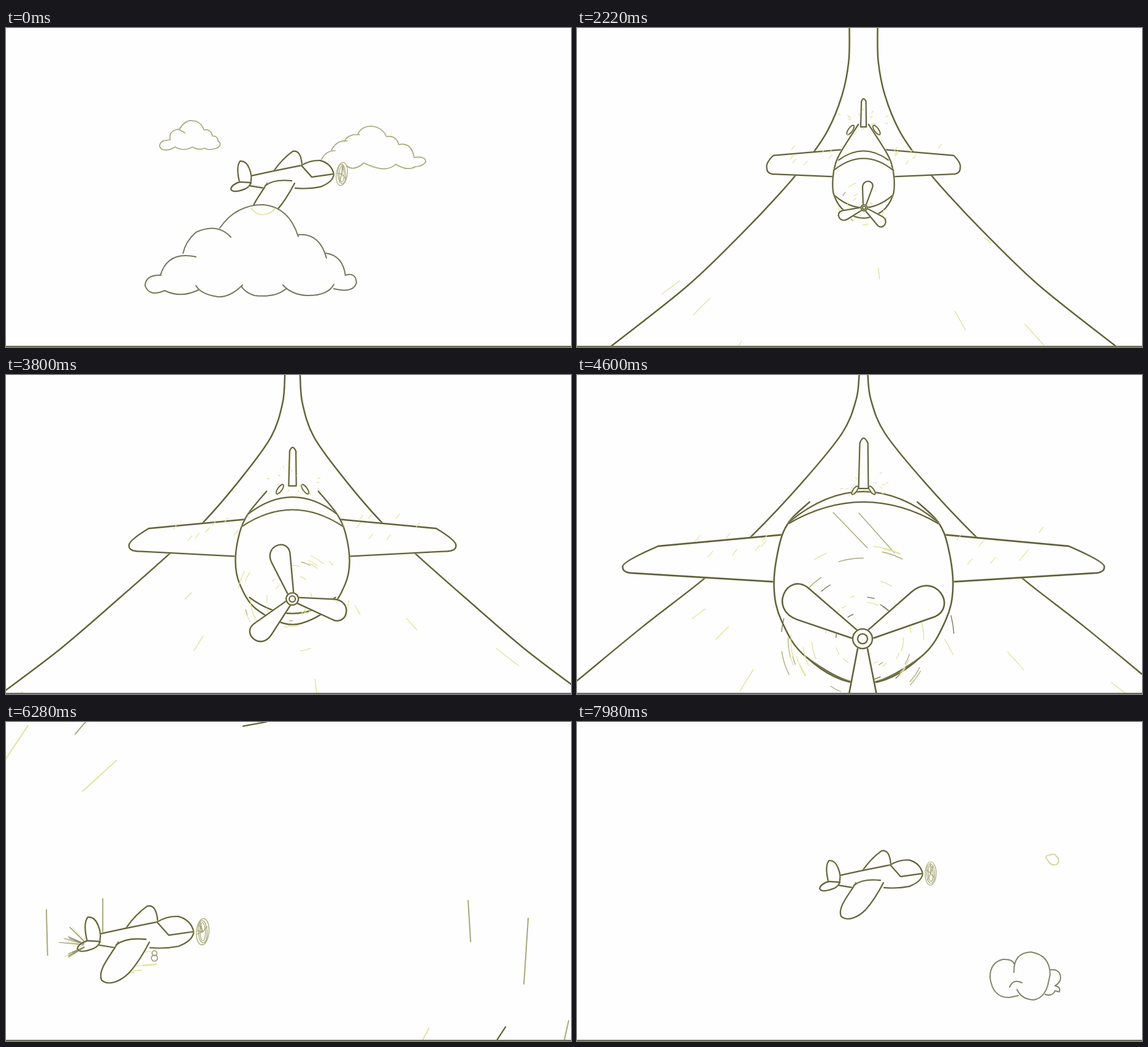
Animation of 922 by 520 pixels, one loop 8000 ms. Source, as an HTML page with a canvas:

```html
<!DOCTYPE html>
<html lang="en">
<head>
<meta charset="utf-8">
<title>Sketched plane</title>
<style>
html, body { margin: 0; width: 100%; height: 100%; overflow: hidden; background: #fefefe; }
canvas { display: block; }
</style>
</head>
<body>
<canvas id="stage" width="922" height="520"></canvas>
<script>
const ctx = document.getElementById('stage').getContext('2d');
const LOOP = 8000, W = 922, H = 520, MID = 467.5;
const INK = '#5a5a40', PALE = '#e2e29c', SOFT = '#a8a878', PAPER = '#fefefe';

const clamp = (v, a = 0, b = 1) => Math.min(b, Math.max(a, v));
const mix = (a, b, u) => a.map((v, i) => v + (b[i] - v) * u);

function random(seed) {
  let s = seed * 7919 + 12345 >>> 0;
  return () => {
    s = s + 0x6D2B79F5 >>> 0;
    let x = Math.imul(s ^ s >>> 15, 1 | s);
    x ^= x + Math.imul(x ^ x >>> 7, 61 | x);
    return ((x ^ x >>> 14) >>> 0) / 4294967296;
  };
}

// Piecewise linear track of [time, ...values]; the ends extrapolate.
function track(t, keys) {
  let i = 0;
  while (i < keys.length - 2 && t > keys[i + 1][0]) i++;
  const a = keys[i], b = keys[i + 1];
  return mix(a, b, (t - a[0]) / (b[0] - a[0])).slice(1);
}

function ink(path, color = INK, width = 2, fill) {
  if (fill) { ctx.fillStyle = PAPER; ctx.fill(path); }
  if (color === INK) {
    ctx.strokeStyle = 'rgba(214,214,140,.5)';
    ctx.lineWidth = width + 1.6;
    ctx.stroke(path);
  }
  ctx.strokeStyle = color;
  ctx.lineWidth = width;
  ctx.stroke(path);
}

function line(x1, y1, x2, y2, color = PALE, width = 1.4) {
  const p = new Path2D();
  p.moveTo(x1, y1);
  p.lineTo(x2, y2);
  ink(p, color, width);
}

// Smooth curve through points
function curve(pts) {
  const p = new Path2D();
  p.moveTo(...pts[0]);
  for (let i = 0; i < pts.length - 1; i++) {
    const a = pts[i - 1] || pts[i], b = pts[i], c = pts[i + 1], d = pts[i + 2] || c;
    p.bezierCurveTo(b[0] + (c[0] - a[0]) / 6, b[1] + (c[1] - a[1]) / 6,
      c[0] - (d[0] - b[0]) / 6, c[1] - (d[1] - b[1]) / 6, c[0], c[1]);
  }
  return p;
}

const pairs = (v, side = 1) => {
  const out = [];
  for (let i = 0; i < v.length; i += 2) out.push([MID + side * v[i], v[i + 1]]);
  return out;
};

/* ---------- front view ---------- */

// Half outlines as (distance from the middle, y)
const trails = [
  [31, 0, 30, 60, 35, 115, 45, 175, 64, 213, 110, 278, 165, 341, 250, 430, 355, 519],
  [16, 0, 19, 50, 35, 105, 70, 160, 118, 222, 162, 265, 230, 332, 320, 412, 462, 519],
  [7, 0, 12, 40, 35, 95, 100, 175, 182, 262, 260, 332, 360, 410, 467, 498, 494, 519]
];

const poses = [
  { tail: [4, 133], wing: [30, 175, 123, 181, 129, 196, 124, 209, 41, 213],
    body: [30, 178, 38, 196, 41, 213, 41, 240, 24, 263, 0, 272],
    arcs: [41, 212, 195, 41, 212, 195, 38, 245, 270],
    fin: [101, 142, 4], stab: [17, 145, 8], prop: [469, 260, 33, 4, 36] },
  { tail: [12, 178], wing: [44, 219, 168, 231, 183, 256, 163, 264, 59, 268],
    body: [40, 218, 52, 242, 58, 275, 54, 302, 36, 330, 0, 343],
    arcs: [40, 218, 205, 56, 250, 228, 55, 298, 313],
    fin: [128, 178, 5], stab: [25, 185, 10], prop: [468, 322, 52, 6, 52] },
  { tail: [88, 207], wing: [128, 260, 335, 279, 393, 313, 375, 323, 147, 337],
    body: [122, 240, 138, 280, 146, 345, 134, 400, 93, 460, 0, 503],
    arcs: [122, 240, 190, 122, 242, 207, 93, 460, 503],
    fin: [103, 185, 8], stab: [14, 188, 8], prop: [466, 430, 146, 16, 148] },
  { tail: [200, -60], wing: [345, 133, 700, 165, 900, 230, 800, 260, 350, 295],
    body: [285, 0, 330, 80, 350, 290, 345, 400, 310, 560, 0, 700],
    arcs: [285, 0, -80, 285, 20, -50, 310, 560, 700],
    fin: [-200, -100, 20], stab: [40, -90, 20], prop: [475, 393, 640, 73, 440] }
];

function blend(a, b, u) {
  const out = {};
  for (const k in a) out[k] = mix(a[k], b[k], u);
  return out;
}

function progress(t) {
  if (t < 2940) return [0, (t - 1400) / 1540];
  if (t < 4760) return [1, Math.pow(clamp((t - 2940) / 1660), 1.4)];
  return [2, (Math.pow(4, (t - 4760) / 680) - 1) / 3];
}

function drawTrail(i, u) {
  if (i > 1) ctx.globalAlpha = clamp(1 - u * 2);
  const pts = i > 1 ? trails[2] : mix(trails[i], trails[i + 1], u);
  for (const s of [-1, 1]) ink(curve(pairs(pts, s)), INK, 2.2);
  ctx.globalAlpha = 1;
}

function drawGround(t) {
  for (let n = 0; n < 7; n++) {
    const dir = [-1.0, -.62, .12, .55, 1.3, -1.35, .9][n];
    const u = (t / 620 + n * .37) % 1;
    const y = 330 + u * 190, len = 6 + u * 36;
    line(MID + dir * (y - 190), y, MID + dir * (y - 190 + len), y + len);
  }
}

function drawSpecks(p, t) {
  const rnd = random(Math.floor(t / 80));
  const span = p.wing[2] - p.wing[0];
  for (let n = 0; n < 14; n++) {
    const side = n % 2 ? 1 : -1;
    const x = MID + side * (p.wing[0] + span * (.1 + .7 * rnd()));
    const y = p.wing[1] - 4 + rnd() * (p.wing[9] - p.wing[1]) * .7;
    const l = 3 + span * .03;
    line(x, y, x + l * .8, y - l, PALE, 1.2);
  }
  for (let n = 0; n < 16; n++) {
    const a = rnd() * 6.28, r = 14 + rnd() * 30;
    const x = MID + Math.cos(a) * r, y = p.fin[1] - 8 + Math.sin(a) * r * .6;
    line(x, y, x + Math.cos(a) * 4, y + Math.sin(a) * 3, PALE, 1.2);
  }
}

function streak(cx, cy, r, a, sweep, color, width) {
  const p = new Path2D();
  p.arc(cx, cy, Math.max(r, 0), a, a + sweep);
  ink(p, color, width);
}

function drawStreaks(cx, cy, ring, t) {
  const rnd = random(Math.floor(t / 80) + 3);
  const big = ring > 180;
  const count = Math.round(clamp(ring * .36, 12, 75));
  const tones = [PALE, PALE, PALE, SOFT, big || ring > 100 ? '#707050' : PALE];
  for (let n = 0; n < count; n++) {
    const r = ring * (.28 + .75 * rnd()), a = rnd() * 6.28;
    streak(cx, cy, r, a, .1 + rnd() * .26, tones[Math.floor(rnd() * 5)], 1.3 + (big ? rnd() : 0));
  }
  if (!big) return;
  for (let n = 0; n < 48; n++) {
    const tone = ['#3c3c2a', '#77775a', SOFT, PALE][n % 4];
    streak(cx, cy, ring * (.78 + .27 * rnd()), -1.05 + rnd() * 1.05, .08 + rnd() * .2, tone, 1 + rnd() * 2);
  }
  for (let n = 0; n < 22; n++) {
    streak(cx, cy, ring * (.62 + .18 * rnd()), -2.45 + (n % 2) * .62 + rnd() * .2, .1 + rnd() * .1,
      n % 3 ? SOFT : '#666648', 1.4);
  }
}

function drawProp([x, y, R, hub, ring], t) {
  drawStreaks(x, y, ring, t);
  const large = t >= 5000;
  const blades = large ? 4 : 3;
  const time = t > 4600 ? Math.max(t, 4760) : t;
  const [spin] = track(time, [[1400, -18], [2940, 1215], [4600, 2370], [4760, 2370], [5440, 2887]]);
  const width = clamp(1.7 + hub * .035, 1.7, 4.5);
  if (large) ctx.setLineDash([16, 3, 34, 5, 8, 3]);
  for (let n = 0; n < blades; n++) {
    const a = (spin + n * 360 / blades) * Math.PI / 180;
    const at = (u, v) => [x + R * (u * Math.cos(a) - v * Math.sin(a)), y + R * (u * Math.sin(a) + v * Math.cos(a))];
    const p = new Path2D();
    p.moveTo(...at(.11, -.055));
    p.lineTo(...at(.74, -.18));
    p.bezierCurveTo(...at(1.08, -.24), ...at(1.1, .22), ...at(.82, .19));
    p.lineTo(...at(.11, .055));
    ink(p, INK, width, !large);
  }
  ctx.setLineDash([]);
  const disc = r => { const p = new Path2D(); p.arc(x, y, r, 0, 7); return p; };
  ink(disc(hub), INK, width * .9, true);
  ink(disc(hub * .5), INK, width * .9);
}

function drawFront(t) {
  const [i, u] = progress(t);
  const p = blend(poses[i], poses[i + 1], u);
  const w = clamp(1.8 + p.prop[3] * .03, 1.8, 4.5);

  drawTrail(i, u);
  if (t < 5000) drawGround(t);
  ctx.globalAlpha = clamp((5900 - t) / 220);

  for (const s of [-1, 1]) {
    const [a, b, c, d, e] = pairs(p.wing, s);
    const wing = new Path2D();
    wing.moveTo(...a);
    wing.lineTo(...b);
    wing.quadraticCurveTo(c[0] + s * 2, c[1] - 8, ...c);
    wing.quadraticCurveTo(c[0], d[1], ...d);
    wing.lineTo(...e);
    ink(wing, INK, w, true);
  }

  const half = [...pairs(p.tail, -1), ...pairs(p.body, -1)];
  const other = [...pairs(p.tail), ...pairs(p.body)].reverse();
  ink(curve([...half, ...other.slice(1)]), INK, w, true);
  for (let n = 0; n < 9; n += 3) {
    const [x, y, top] = p.arcs.slice(n, n + 3);
    const arc = new Path2D();
    arc.moveTo(MID - x, y);
    arc.quadraticCurveTo(MID, 2 * top - y, MID + x, y);
    ink(arc, INK, w * .9);
  }

  const [sx, sy, sr] = p.stab;
  for (const s of [-1, 1]) {
    const stab = new Path2D();
    stab.ellipse(MID + s * sx, sy, Math.max(1, sr), Math.max(1, sr * .38), s * .95, 0, 7);
    ink(stab, INK, 1.6, true);
  }
  const [top, base, fw] = p.fin;
  const fin = new Path2D();
  fin.moveTo(MID - fw, base);
  fin.lineTo(MID - fw * .75, top + fw);
  fin.quadraticCurveTo(MID, top - fw, MID + fw * .9, top + fw);
  fin.lineTo(MID + fw, base);
  fin.closePath();
  ink(fin, INK, 1.9, true);

  if (t < 5000) drawSpecks(p, t);
  if (i === 1 && u > .6 || i === 2 && u < .3) {
    ctx.globalAlpha = i === 1 ? (u - .6) / .4 : 1 - u / .3;
    line(418, 224, 474, 282, SOFT);
    line(460, 225, 518, 290, SOFT);
    ctx.globalAlpha = 1;
  }
  drawProp(p.prop, t);
  ctx.globalAlpha = 1;
}

/* ---------- side view ---------- */

// Drawn around the nose at 0,0
const sideParts = [
  'M-98 -5 Q-84 -25 -67 -37 Q-54 -40 -52 -15',
  'M-154 13 Q-160 -12 -153 -21 Q-143 -22 -138 -9 Q-132 5 -137 18',
  'M-154 13 Q-168 18 -168 25 Q-164 32 -144 24 Q-137 20 -135 14 Z',
  'M-135 3 L-98 -5 L-53 -14 Q-38 -23 -22 -22 Q-4 -17 0 0 Q-1 13 -22 21 Q-42 25 -63 23',
  'M-53 -14 L-36 5 L-1 0',
  'M-138 19 L-114 23',
  'M-109 15 C-118 32 -140 55 -133 70 C-122 79 -105 71 -93 59 Q-78 42 -64 15',
  'M-112 19 Q-98 8 -69 11'
].map(d => new Path2D(d));

function drawPlane(x, y, scale, t) {
  ctx.save();
  ctx.translate(x, y);
  ctx.scale(scale, scale);
  sideParts.forEach((p, n) => ink(p, INK, 1.9 / scale, n === 6));
  const rnd = random(Math.floor(t / 60));
  for (let n = 0; n < 3; n++) {
    const e = new Path2D();
    e.ellipse(13, 0, 9 - n * 2.5, 19 - n * 3, rnd() * .3 - .15, 0, 6.28);
    ink(e, SOFT, 1.2);
  }
  for (let n = 0; n < 5; n++) {
    const a = rnd() * 6.28;
    line(13, 0, 13 + Math.cos(a) * 7, Math.sin(a) * 16, SOFT, 1.4);
  }
  ctx.restore();
}

function drawDust(x, y, t) {
  const rnd = random(Math.floor(t / 80));
  for (let n = 0; n < 15; n++) {
    const a = 2.4 + rnd() * 1.7, r = 24 + rnd() * 24;
    line(x - 172 + Math.cos(a) * 8, y + 22 + Math.sin(a) * 6,
      x - 172 + Math.cos(a) * r, y + 22 + Math.sin(a) * r * .8, n % 3 ? '#8c8c66' : PALE, 1.2);
  }
  for (let n = 0; n < 8; n++) {
    const sx = x - 145 + rnd() * 70, sy = y + 32 + rnd() * 55;
    line(sx, sy, sx + 22, sy - 2, PALE, 1.4);
  }
  const wheel = new Path2D();
  wheel.arc(x - 64, y + 35, 4, 0, 7);
  wheel.moveTo(x - 59, y + 43);
  wheel.arc(x - 64, y + 43, 5, 0, 7);
  ink(wheel, '#8c8c66', 1.4);
}

const bigCloud = [
  'M349 326 Q375 288 420 288 Q462 292 477 340',
  'M477 337 Q512 334 523 375',
  'M522 367 Q550 371 554 404',
  'M554 403 Q571 398 572 415 Q567 433 535 425',
  'M535 418 Q525 437 490 436 Q465 434 452 419',
  'M457 425 Q440 440 405 436 Q390 431 384 421',
  'M386 419 Q365 440 345 438 Q318 434 310 420',
  'M314 427 Q285 441 259 428',
  'M259 428 Q234 439 227 420 Q228 402 253 403',
  'M252 403 Q264 363 310 373',
  'M289 367 Q293 348 310 333 Q345 317 367 341'
].map(d => new Path2D(d));
const leftCloud = new Path2D('M255 198 Q246 192 256 184 L268 182 Q265 168 281 165 L292 171 M283 165 Q292 150 304 151 Q318 152 323 166 Q334 164 337 176 Q346 176 346 184 Q354 190 344 196 Q330 200 324 196 Q315 200 304 194 Q290 202 276 194 Q265 201 255 198');
const rightCloud = new Path2D('M515 214 Q522 200 537 200 M531 199 Q540 182 557 184 M552 185 Q558 172 577 174 M574 173 Q580 160 597 160 Q614 162 621 177 Q636 174 641 190 Q662 186 666 211 Q684 208 685 218 Q680 226 668 226 Q655 234 636 222 Q620 238 584 220 Q568 234 556 225');
const newCloud = new Path2D('M714 396 Q712 386 695 387 Q674 392 674 416 Q678 450 706 449 L720 446 M713 408 Q712 376 741 375 Q772 380 772 412 L768 430 M718 436 Q725 452 745 453 Q762 450 768 430 M772 404 Q788 402 789 416 Q790 424 780 430 Q790 432 787 440 L780 438 Q776 448 764 444 M706 432 Q712 418 726 425');
const puff = new Path2D('M768 225 Q761 218 771 217 Q780 213 782 219 Q790 224 783 232 Q774 236 768 225 Z');

function shifted(dx, dy, draw) {
  ctx.save();
  ctx.translate(dx, dy);
  draw();
  ctx.restore();
}

function drawOpening(t) {
  shifted(-t * .03, 0, () => {
    ink(leftCloud, SOFT, 1.7);
    ink(rightCloud, SOFT, 1.7);
  });
  drawPlane(535, 238, 1, t);
  shifted(-t * .06, 0, () => {
    bigCloud.forEach(p => ink(p, '#77775c', 2, true));
    ink(new Path2D('M400 294 Q410 306 420 304 Q434 303 439 294'), PALE, 1.6);
  });
}

// Arcs left behind by the passing propeller
function drawLeftovers(t) {
  ctx.globalAlpha = clamp((6400 - t) / 110);
  const k = 1 + (t - 6280) * .0004;
  const far = [
    [0, 60, 36, 6, PALE], [113, 20, 130, 0, SOFT], [125, 113, 180, 63, PALE],
    [387, 7, 425, 0, INK], [66, 306, 68, 380, SOFT], [158, 288, 158, 342, SOFT],
    [754, 291, 758, 358, SOFT], [852, 320, 845, 427, SOFT], [680, 518, 690, 499, PALE],
    [800, 520, 815, 497, INK], [911, 518, 918, 487, SOFT]
  ];
  const grow = (x, y) => [475 + (x - 475) * k, 393 + (y - 393) * k];
  for (const [a, b, c, d, color] of far) line(...grow(a, b), ...grow(c, d), color, 2);
  const extra = clamp((6200 - t) / 400);
  const rnd = random(Math.floor(t / 80));
  for (let n = 0; n < 60 * extra; n++) {
    streak(475, 393, 260 + rnd() * 260, rnd() * 6.28, .08 + rnd() * .18, n % 3 ? PALE : SOFT, 1.6);
  }
  ctx.globalAlpha = 1;
}

function drawReturn(t) {
  if (t < 6400) drawLeftovers(t);
  const [x, y, s] = track(t, [
    [5700, -30, 420, 1.2], [6280, 306, 342, 1.13], [6600, 407, 300, 1.08],
    [6840, 407, 300, 1.08], [7260, 482, 268, 1.03], [7680, 540, 250, 1], [7980, 564, 247, 1]
  ]);
  if (t > 6840) {
    const rise = Math.pow(1 - clamp((t - 6900) / 900), 3);
    shifted(8 * rise, 150 * rise, () => ink(newCloud, '#85856a', 2));
  }
  if (t > 7680) {
    ctx.globalAlpha = clamp((t - 7680) / 150);
    ink(puff, '#d0d08c', 1.6);
    ctx.globalAlpha = 1;
  }
  ctx.globalAlpha = clamp((6900 - t) / 200);
  if (t < 6900) drawDust(x, y, t);
  ctx.globalAlpha = 1;
  drawPlane(x, y, s, t);
}

function frame(now) {
  const t = now % LOOP;
  ctx.lineCap = ctx.lineJoin = 'round';
  ctx.fillStyle = PAPER;
  ctx.fillRect(0, 0, W, H);
  if (t < 400) drawOpening(t);
  else {
    if (t < 5900) drawFront(t);
    if (t > 5700) drawReturn(t);
  }
  ctx.fillStyle = '#6c6c5c';
  ctx.fillRect(0, 518, W, 2);
  requestAnimationFrame(() => frame(performance.now()));
}
frame(performance.now());
</script>
</body>
</html>
```
